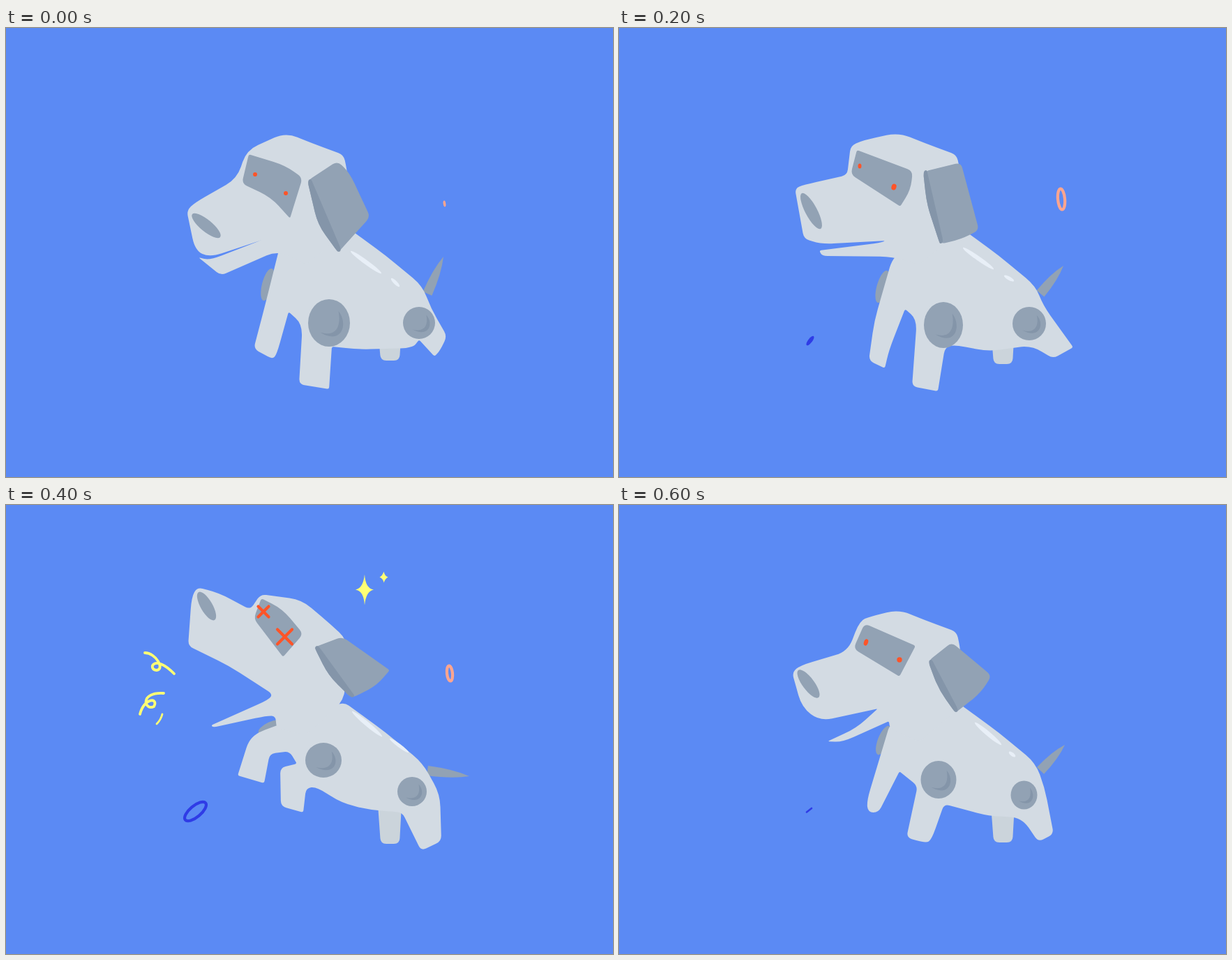
Recreate the animation shown at these times as an HTML page. Size 870 px wide and 644 px high, loop 700 ms.

```html
<!DOCTYPE html>
<html lang="en">
<head>
<meta charset="utf-8">
<title>Howling robot dog</title>
<style>
html, body { margin: 0; width: 100%; height: 100%; overflow: hidden; background: #5b8af4; }
svg { display: block; width: 870px; height: 644px; }
.step { visibility: hidden; animation: show 700ms step-end infinite; animation-delay: calc((var(--i) - 7) * 100ms); }
@keyframes show {
  0% { visibility: visible; }
  14.2858%, 100% { visibility: hidden; }
}
</style>
</head>
<body>
<svg id="stage" viewBox="0 0 870 644"></svg>
<script>
const stage = document.getElementById('stage');
const LIGHT = '#d3dbe3', GREY = '#92a2b4', DARK = '#8495a9', SHINE = '#e8eff7';
const RED = '#ff5428', PINK = '#ffa58f', YELLOW = '#ffff74', BLUE = '#2f3ce6';

// Parts that hold still between poses
const BACK = '485,283 545,327 597,370 ';
const SKULL_LOW = ' 401,150 438,165 484,182 490,210 490,290 430,340';
const SKULL_HIGH = ' 465,171 490,194 485,280 430,330';
const TAIL_ROOT = [604, 381];

const parse = text => text.split(' ').map(p => p.split(',').map(Number));

// Closed outline: gentle bends become curves, tight corners stay crisp.
function shape(pts, fill) {
  const n = pts.length;
  let d = '';
  pts.forEach(([x, y], i) => {
    const [px, py] = pts[(i + n - 1) % n], [nx, ny] = pts[(i + 1) % n];
    const a = Math.hypot(x - px, y - py), b = Math.hypot(nx - x, ny - y);
    const cos = ((x - px) * (nx - x) + (y - py) * (ny - y)) / (a * b);
    const reach = cos > 0.6 ? 18 : cos > 0 ? 8 : 3;
    const s = Math.min(reach, a / 2) / a, e = Math.min(reach, b / 2) / b;
    d += `${i ? 'L' : 'M'}${x + (px - x) * s} ${y + (py - y) * s}`
       + `Q${x} ${y} ${x + (nx - x) * e} ${y + (ny - y) * e}`;
  });
  return `<path d="${d}Z" fill="${fill}"/>`;
}

const oval = (x, y, rx, ry, turn, paint) =>
  `<ellipse rx="${rx}" ry="${ry}" transform="translate(${x} ${y}) rotate(${turn})" ${paint}/>`;
const dot = (x, y, rx, ry = rx, turn = 0, color = RED) => oval(x, y, rx, ry, turn, `fill="${color}"`);
const ring = (x, y, rx, ry, turn, color) =>
  oval(x, y, rx, ry, turn, `fill="none" stroke="${color}" stroke-width="4.2"`);
const line = (d, color, width) =>
  `<path d="${d}" fill="none" stroke="${color}" stroke-width="${width}" stroke-linecap="round"/>`;
const cross = (x, y, r) =>
  line(`M${x + r} ${y - r}L${x - r} ${y + r}M${x - r} ${y - r}L${x + r} ${y + r}`, RED, 4.2);
const star = (x, y, rx, ry) =>
  `<path transform="translate(${x} ${y})" fill="${YELLOW}" d="M0 ${-ry}Q1 -2 ${rx} 0Q2 2 0 ${ry}Q-1 2 ${-rx} 0Q-2 -2 0 ${-ry}Z"/>`;

// Slim oval stretched between two tips
function lens(tips, half, color) {
  const [[ax, ay], [bx, by]] = parse(tips);
  const dx = bx - ax, dy = by - ay;
  return dot((ax + bx) / 2, (ay + by) / 2, Math.hypot(dx, dy) / 2, half,
    Math.atan2(dy, dx) * 180 / Math.PI, color);
}

function tail(tip) {
  const [[tx, ty]] = parse(tip), [x, y] = TAIL_ROOT;
  const dx = tx - x, dy = ty - y, len = Math.hypot(dx, dy);
  const nx = -dy / len * 7, ny = dx / len * 7;
  const mx = x + dx * 0.6, my = y + dy * 0.6;
  return `<path fill="${GREY}" d="M${x + nx} ${y + ny}Q${mx + nx} ${my + ny} ${tx} ${ty}`
       + `Q${mx - nx} ${my - ny} ${x - nx} ${y - ny}Z"/>`;
}

const joint = ([x, y, rx, ry = rx]) => dot(x, y, rx, ry, 0, GREY)
  + `<path transform="translate(${x} ${y}) scale(${rx} ${ry})" fill="${DARK}" d="M.45 -.5C.95 .05 .6 .95 -.42 .4C.3 .6 .6 .2 .45 -.5Z"/>`;

function ear(text) {
  const pts = parse(text), [top] = pts, [bottom, bulge] = pts.slice(-2);
  const side = [top, [top[0] + 5, top[1] - 3], [bottom[0] + 5, bottom[1] - 3], bottom, bulge];
  return shape(pts, GREY) + shape(side, DARK);
}

const farLeg = y => shape([[533, 430], [567, 430], [564, y], [537, y]], '#cbd4db');

function group(i, ...parts) {
  stage.insertAdjacentHTML('beforeend', `<g class="step" style="--i:${i}">${parts.join('')}</g>`);
}

function pose(i, p) {
  const raised = i > 2 && i < 6;
  group(i,
    tail(p.tail), lens(p.farPaw, 8, GREY), farLeg(p.farLeg),
    shape(parse(BACK + p.legs), LIGHT),
    shape(parse(p.face + (raised ? SKULL_HIGH : SKULL_LOW)), LIGHT),
    lens(p.shine, 3.2, SHINE), lens(p.glint, 2.5, SHINE),
    joint(p.shoulder), joint(p.hip),
    shape(parse(p.mask), GREY), lens(p.nose, 8.5, GREY), ear(p.ear));
}

pose(0, {
  face: '390,319 308,355 276,329 292,333 367,304 292,329 271,319 259,262 270,251 331,216 345,175',
  legs: '609,402 632,442 622,463 614,471 592,447 583,459 505,461 467,457 463,518 420,511 425,425 405,407 388,468 382,475 355,460 372,395 392,315',
  ear: '432,219 475,191 492,207 522,271 476,322 447,282',
  mask: '348,181 400,197 425,215 407,273 380,243 338,223',
  nose: '267,267 307,300', shoulder: [463, 423, 30, 34], hip: [592, 423, 23],
  tail: '627,328', farPaw: '381,345 369,391', farLeg: 477,
  shine: '494,320 538,352', glint: '552,359 564,371'
});
pose(1, {
  face: '391,317 313,355 279,333 300,332 365,313 374,299 290,325 273,323 257,260 270,247 329,219 334,179',
  legs: '618,402 641,456 615,471 588,453 577,461 485,459 469,453 463,508 458,521 421,512 428,422 404,405 385,477 379,483 353,468 368,412 392,315',
  ear: '432,218 476,189 494,204 524,268 478,317 451,280',
  mask: '339,181 400,197 421,213 409,267 386,243 341,222',
  nose: '269,266 309,299', shoulder: [463, 423, 30, 33], hip: [590, 425, 23.5],
  tail: '631,327', farPaw: '382,346 365,397', farLeg: 483,
  shine: '500,317 551,353', glint: '555,357 565,362'
});
pose(2, {
  face: '392,328 291,327 287,319 375,308 382,305 290,310 265,302 252,230 265,225 327,211 332,169 350,161',
  legs: '608,398 651,458 622,474 591,455 530,464 479,454 467,459 457,521 420,514 427,418 410,403 387,462 381,488 358,477 366,420 393,326',
  ear: '436,206 490,193 516,290 490,303 460,310 441,252',
  mask: '341,175 421,205 418,232 403,256 332,210',
  nose: '262,237 289,288', shoulder: [465, 426, 28, 33], hip: [588, 424, 24],
  tail: '637,341', farPaw: '384,348 371,394', farLeg: 482,
  shine: '493,315 537,346', glint: '552,355 566,363'
});
pose(3, {
  face: '385,318 385,302 294,312 286,308 355,294 383,281 268,216 260,206 263,185 273,137 285,137 345,160 359,138 415,140',
  legs: '617,402 625,487 602,494 592,484 581,456 495,443 471,433 457,451 449,486 428,481 419,446 437,408 412,368 377,399 373,442 348,439 344,401 386,318',
  ear: '442,200 486,192 530,239 541,263 470,290 455,258',
  mask: '362,144 413,203 377,225 350,172',
  nose: '274,139 297,177', shoulder: [469, 401, 25, 29], hip: [582, 426, 23],
  tail: '655,364', farPaw: '386,314 368,351', farLeg: 487,
  shine: '491,301 542,340', glint: '560,350 577,365'
});
pose(4, {
  face: '387,320 387,303 375,302 297,319 294,316 377,279 382,271 320,231 261,202 266,132 274,118 305,126 350,150 365,128 424,136',
  legs: '622,415 624,482 595,496 568,441 520,437 480,427 445,404 430,406 426,441 394,432 393,377 417,371 406,353 378,357 370,399 332,388 350,331 388,316',
  ear: '442,204 482,189 550,237 530,260 495,277 462,244',
  mask: '366,134 396,149 426,185 397,218 355,163',
  nose: '276,125 299,165', shoulder: [455, 366, 26, 25], hip: [582, 411, 21],
  tail: '664,389', farPaw: '362,327 397,311', farLeg: 486,
  shine: '496,296 539,332', glint: '550,335 577,355'
});
pose(5, {
  face: '386,318 386,297 305,307 289,300 380,276 345,262 267,242 254,176 264,169 354,172 371,147 428,147',
  legs: '625,420 624,488 595,492 563,439 490,425 442,401 424,413 422,455 398,455 391,386 418,373 404,353 379,362 371,417 347,412 351,338 387,316',
  ear: '455,213 487,200 527,243 538,264 490,288 472,255',
  mask: '376,152 426,209 396,241 360,178',
  nose: '261,178 287,213', shoulder: [446.5, 368, 19, 18.5], hip: [577, 413, 19],
  tail: '658,373', farPaw: '361,333 396,311', farLeg: 489,
  shine: '498,302 551,336', glint: '562,342 577,352'
});
pose(6, {
  face: '388,320 387,310 320,340 299,339 340,320 371,292 288,310 262,290 248,240 260,230 328,210 345,166 360,160',
  legs: '610,405 623,472 601,483 577,448 530,446 466,429 448,480 440,485 412,477 428,403 402,382 372,441 357,441 355,425 388,315',
  ear: '443,224 477,197 534,245 518,270 482,298 458,264',
  mask: '352,170 425,202 402,246 336,206',
  nose: '257,237 286,276', shoulder: [458, 394, 25.5, 27], hip: [580.5, 416, 19, 20.5],
  tail: '639,344', farPaw: '387,317 371,358', farLeg: 484,
  shine: '510,312 548,344', glint: '559,354 568,361'
});

// Eyes and the bursts around the howl
group(0, dot(357, 210, 3), dot(401, 237, 3), dot(628.5, 252, 1.8, 4.5, -8, PINK));
group(1, dot(355, 210, 3), dot(402, 239, 3), ring(631, 251, 2.8, 9, -6, PINK));
group(2, dot(345, 198, 2.5, 3.5), dot(394, 228, 3.5, 4.5, 20),
  ring(634, 245.5, 5, 15, -5, PINK), lens('279,442 269,455', 3, BLUE));
group(3, dot(363, 167, 5), dot(388, 205, 7), ring(635, 243, 7.5, 21, -6, PINK),
  ring(272, 446, 10.5, 4.5, -52, BLUE), star(511.5, 126.5, 6, 11),
  lens('225,234 249,250', 3, YELLOW), lens('226,273 242,269', 2, YELLOW), lens('229,306 246,289', 3, YELLOW));
group(4, cross(369, 153, 7.5), cross(399.5, 189, 10.5), ring(636, 241.5, 4, 11, -6, PINK),
  ring(271.5, 439.5, 19, 8, -40, BLUE), star(514, 121.5, 13, 22), star(541.5, 103.5, 6, 8),
  line('M199 212C215 212 228 236 216 237C202 236 212 212 241 242', YELLOW, 3.8),
  line('M226 270C190 268 199 296 212 289C219 276 198 276 192 300', YELLOW, 3.8),
  line('M224 300Q222 308 216 314', YELLOW, 2.8));
group(5, dot(374, 177, 3.7, 6.5, 20), dot(402, 214, 4.2, 6.5, 15), dot(636, 240, 2.5, 5.5, -8, PINK),
  ring(271, 439, 9, 3.2, -36, BLUE), star(510, 122, 10, 15), star(539, 104, 6, 9),
  `<path d="M172 231Q178 220 202 224Q186 226 174 232Z" fill="${YELLOW}"/>`, lens('188,309 180,326', 3.2, YELLOW));
group(6, dot(354, 197, 3, 4.8, 20), dot(402, 222, 3.7), line('M269 440.5L276 435', BLUE, 2.6));
</script>
</body>
</html>
```
